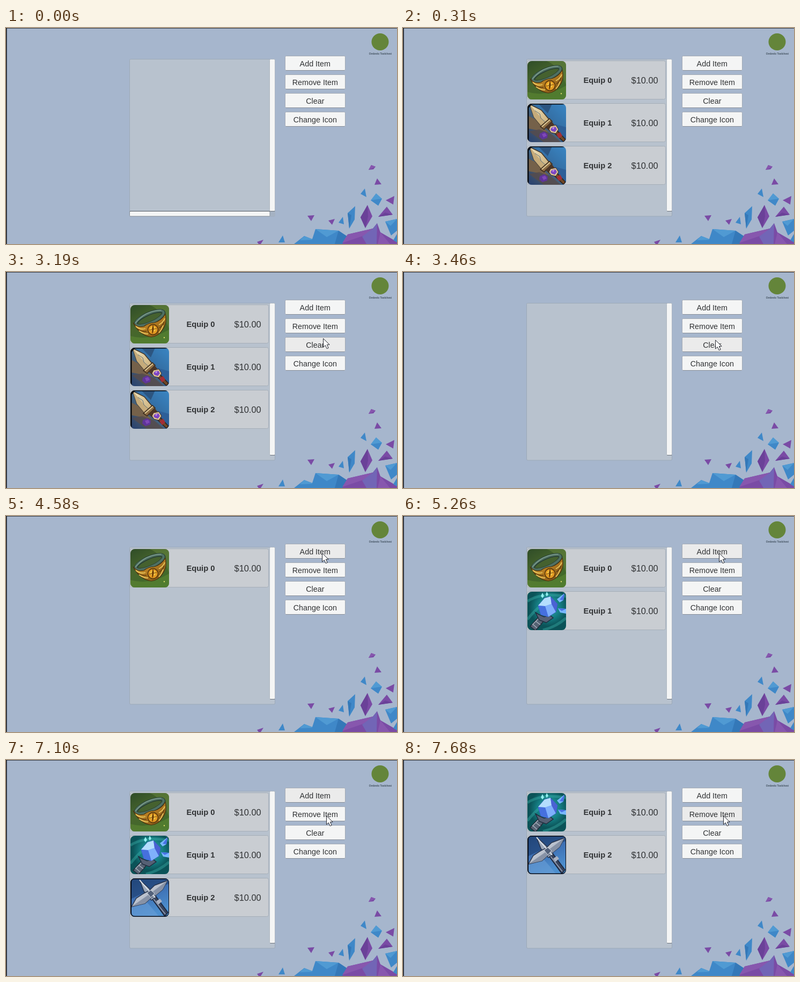
Recreate the animation shown at these times as an HTML page. Size 729x405 px, loop 8 s.

```html
<!DOCTYPE html>
<html lang="en">
<head>
<meta charset="utf-8">
<title>Item list</title>
<style>
  html, body { margin: 0; width: 100%; height: 100%; overflow: hidden; background: #a6b6cd; }
  svg { display: block; width: 100vw; height: 100vh; }
  text { font-family: "Liberation Sans", Arial, sans-serif; fill: #303234; text-anchor: middle; }
  .label { font-size: 14.35px; }
  .name { font-size: 14.7px; font-weight: bold; }
  .price { font-size: 16.4px; }
  .tiny { font-size: 4.7px; font-weight: bold; fill: #435260; }
  .p1 { fill: #7a4ba5; } .p2 { fill: #8757ae; } .p3 { fill: #6a4198; } .p4 { fill: #7265b6; }
  .b1 { fill: #3f88c8; } .b2 { fill: #509ad3; } .b3 { fill: #3478b8; }
</style>
</head>
<body>
<svg viewBox="0 0 729 405" preserveAspectRatio="none">
  <defs>
    <clipPath id="tile"><rect width="72" height="72" rx="8"/></clipPath>
    <linearGradient id="moss" x2=".6" y2="1">
      <stop stop-color="#2f4c28"/><stop offset=".5" stop-color="#48662c"/><stop offset="1" stop-color="#3f6a2a"/>
    </linearGradient>
    <linearGradient id="dusk" x1="1" y1="0" x2=".1" y2="1">
      <stop stop-color="#3a86c4"/><stop offset=".4" stop-color="#3470a6"/><stop offset=".7" stop-color="#4a5868"/><stop offset="1" stop-color="#2a4470"/>
    </linearGradient>
    <radialGradient id="sea" cx=".55" cy=".4">
      <stop stop-color="#35a9b4"/><stop offset=".6" stop-color="#157d82"/><stop offset="1" stop-color="#0b5358"/>
    </radialGradient>
    <linearGradient id="frost" x2=".4" y2="1">
      <stop stop-color="#244a80"/><stop offset=".5" stop-color="#3e70b4"/><stop offset="1" stop-color="#4d8fce"/>
    </linearGradient>
    <linearGradient id="gold" x2="1" y2="1">
      <stop stop-color="#dba938"/><stop offset=".5" stop-color="#b47c22"/><stop offset="1" stop-color="#6e4613"/>
    </linearGradient>
    <linearGradient id="bone" x2="1" y2="1">
      <stop stop-color="#efe3bd"/><stop offset="1" stop-color="#c9ad78"/>
    </linearGradient>
    <linearGradient id="steel" x2="1" y2="1">
      <stop stop-color="#e4e8ee"/><stop offset="1" stop-color="#8b96aa"/>
    </linearGradient>

    <g id="ring" clip-path="url(#tile)">
      <rect width="72" height="72" fill="url(#moss)"/>
      <path d="M36 0H72V44Q58 8 36 0Z" fill="#62803c" opacity=".6"/>
      <path d="M0 58Q36 68 72 46V72H0Z" fill="#5f8a34" opacity=".55"/>
      <g transform="rotate(-24 36 25)">
        <ellipse cx="36" cy="25" rx="28" ry="9" fill="#45612f" stroke="#263d33" stroke-width="7"/>
        <ellipse cx="36" cy="24.5" rx="28" ry="9" fill="none" stroke="#4f7062" stroke-width="4.5"/>
        <path d="M8 22Q36 8 62 20" fill="none" stroke="#86a394" stroke-width="1.3"/>
      </g>
      <path d="M5 33Q12 43 25 40Q34 33 45 33Q58 29 65 17Q69 34 60 46Q53 58 39 60Q17 57 5 33Z" fill="url(#gold)" stroke="#4a3310" stroke-width="1.2"/>
      <path d="M10 40Q18 47 28 44M16 48Q25 55 33 54M53 37Q61 33 64 25M53 52Q58 47 61 38" fill="none" stroke="#e8c75e" stroke-width="1.8"/>
      <path d="M12 44Q22 51 30 49M54 43Q60 39 63 31" fill="none" stroke="#5b3b10" stroke-width="1.5"/>
      <circle cx="42" cy="46" r="9.5" fill="#e39a22" stroke="#5e3b0d" stroke-width="1.8"/>
      <circle cx="42" cy="45" r="5" fill="#f8cb46"/>
      <path d="M42 38Q45 45 41 53Q39 45 42 38M35 47L49 44" fill="#754309" stroke="#754309"/>
      <circle cx="63" cy="61" r="1.2" fill="#dcd86a"/>
    </g>

    <g id="spear" clip-path="url(#tile)">
      <rect width="72" height="72" fill="url(#dusk)"/>
      <path d="M0 22L14 29L28 44L40 54L30 52L0 46Z" fill="#75614a"/>
      <path d="M3 52L22 48L44 56L62 72H30Z" fill="#574c4c" opacity=".8"/>
      <path d="M20 0H46L38 18Z" fill="#2c5580"/>
      <path d="M50 38L72 44V72H64Z" fill="#2d5f98"/>
      <path d="M35 40L41 35L71 67L67 71Z" fill="#714827" stroke="#2e2018" stroke-width="1.5"/>
      <path d="M4 1L26 12L40 29L37 40L26 42L12 25Z" fill="url(#bone)" stroke="#413528" stroke-width="1.5"/>
      <path d="M4 1L20 20L35 38L26 42L12 25Z" fill="#c5ab7b"/>
      <path d="M14 13L23 19L25 27L35 36" fill="none" stroke="#5c6f79"/>
      <path d="M24 43L41 28L46 33L31 48Z" fill="#8a6a42" stroke="#39291a" stroke-width="1.5"/>
      <path d="M27 43L42 30" stroke="#dbc796" stroke-width="2"/>
      <path d="M33 44L46 34L51 41L41 51Z" fill="#4b3526"/>
      <path d="M43 42L53 40L58 48L53 56L44 54L40 48Z" fill="#dcc595" stroke="#3c2524"/>
      <path d="M46 44L52 43L55 48L51 53L45 51L43 48Z" fill="#7d45c4"/>
      <path d="M46 45L51 44L48 48Z" fill="#c99bf0"/>
      <path d="M54 58L61 53L65 60L59 65Z" fill="#a32e35"/>
      <path d="M23 56L31 52L38 57L37 64L28 67L22 62Z" fill="#5f349a"/>
      <path d="M27 57L33 55L36 60L30 63Z" fill="#7f48b8"/>
      <path d="M0 0H72V1.5H8L2.5 8V72H0Z" fill="#080b10"/>
    </g>

    <g id="wand" clip-path="url(#tile)">
      <rect width="72" height="72" fill="url(#sea)"/>
      <path d="M0 18Q27 0 72 9M0 52Q16 32 25 27M29 72Q55 65 72 49" fill="none" stroke="#3cb4ac" stroke-width="5" opacity=".4"/>
      <path d="M5 65L22 46L32 53L15 73Z" fill="#566273" stroke="#202a38" stroke-width="1.5"/>
      <path d="M9 62L23 48M10 61L18 68M15 55L24 62" fill="none" stroke="#a3afba" stroke-width="1.5"/>
      <path d="M15 39L22 43L31 47L42 44L48 49L35 58L22 53Z" fill="#556074" stroke="#1f2c3e" stroke-width="1.5"/>
      <path d="M20 26L32 12L43 9L56 23L53 38L39 47L25 43Z" fill="#5d8cf2" stroke="#2a58b8"/>
      <path d="M32 12L43 9L45 23L33 27L20 26Z" fill="#b4defd"/>
      <path d="M33 27L45 23L53 38L39 47Z" fill="#7fb0fb"/>
      <path d="M20 26L33 27L39 47L25 43Z" fill="#4670de"/>
      <path d="M45 23L43 9L56 23L53 38Z" fill="#4a62d4"/>
      <path d="M55 14L69 3L67 16L60 20ZM57 31L72 32V41L61 39Z" fill="#78b8ff"/>
      <path d="M60 15L69 3L67 16ZM57 31L72 32L64 36Z" fill="#4870e4"/>
      <path d="M28 2L31 8L28 12L25 8ZM36 0L39 5L36 9L34 5Z" fill="#91efef"/>
    </g>

    <g id="mace" clip-path="url(#tile)">
      <rect width="72" height="72" fill="url(#frost)"/>
      <path d="M0 0H72V10L40 20L0 39Z" fill="#214578" opacity=".7"/>
      <path d="M0 55L31 45L54 72H0Z" fill="#6a9fd7" opacity=".6"/>
      <path d="M37 34L44 29L70 64L64 71Z" fill="#39445c" stroke="#18233a" stroke-width="1.5"/>
      <path d="M41 36L65 67" stroke="#8d98ae" stroke-width="2"/>
      <path d="M17 3L31 15L41 25L48 34L39 41L25 24Z" fill="#9ba7b9" stroke="#28344b" stroke-width="1.5"/>
      <path d="M69 4L60 21L48 31L39 36L27 47L2 53L11 37L25 28L35 23L45 13Z" fill="url(#steel)" stroke="#2a374f" stroke-width="1.5"/>
      <path d="M69 4L36 29L2 53L27 47L39 36L48 31L60 21Z" fill="#8792a6"/>
      <path d="M17 3L38 27L46 36" fill="none" stroke="#dce2e9" stroke-width="2"/>
      <path d="M31 27L38 22L45 28L38 36Z" fill="#53617a" stroke="#d1d7df"/>
      <path d="M48 43L55 38L59 43L52 49Z" fill="#aab2c2"/>
      <path d="M0 0H72V72H0ZM2 7Q2 2 7 1.5H66Q71 2 71 7V65Q70 70 64 70.5H8Q2 70 2 64Z" fill="#080b14" fill-rule="evenodd"/>
    </g>
  </defs>

  <rect width="729" height="405" fill="#a6b6cd"/>
  <rect width="729" height="1" fill="#343a43"/>
  <rect width="1.6" height="405" fill="#15181d"/>

  <circle cx="697.5" cy="26" r="16" fill="#64853a"/>
  <text class="tiny" x="698" y="49.5">Ombrelo Toolchest</text>

  <g id="shards">
    <path class="p1" d="M676 266L681 257L689 260L685 265Z"/>
    <path class="p2" d="M676 266L681 257L689 260Z"/>
    <path class="p1" d="M692 282L700 293L687 294Z"/>
    <path class="b1" d="M669 301L672 317L661 311Z"/>
    <path class="b2" d="M680 323L690 310L701 320L694 333Z"/>
    <path class="b1" d="M680 323L701 320L694 333Z"/>
    <path class="p1" d="M708 323L724 315L722 331Z"/>
    <path class="p1" d="M674 332L683 353L670 375L661 355Z"/>
    <path class="p3" d="M674 332L675 354L670 375L661 355Z"/>
    <path class="p1" d="M710 335L721 350L694 354Z"/>
    <path class="p3" d="M694 354L707 346L721 350Z"/>
    <path class="b1" d="M637 347L651 334L650 359L640 376Z"/>
    <path class="b3" d="M637 347L644 351L640 376Z"/>
    <path class="p1" d="M562 352L575 351L569 362Z"/>
    <path class="p1" d="M601 361L613 358L608 369Z"/>
    <path class="b1" d="M628 354L630 368L620 365Z"/>
    <path class="b1" d="M707 363L729 358V380L718 389Z"/>
    <path class="b2" d="M707 363L729 358L717 371Z"/>
    <path class="b1" d="M516 389L520 402L508 402Z"/>
    <path class="p1" d="M468 401L480 397L475 405H471Z"/>
    <path class="b1" d="M537 405L556 390L574 397L570 405Z"/>
    <path class="b2" d="M556 390L574 397L548 398Z"/>
    <path class="b1" d="M577 377L620 380L635 390L628 405H568Z"/>
    <path class="b2" d="M577 377L620 380L598 392Z"/>
    <path class="b3" d="M620 380L635 390L628 405H613Z"/>
    <path class="p1" d="M627 405L637 387L684 376L692 366L698 383L729 401V405Z"/>
    <path class="p2" d="M637 387L684 376L668 389L627 403Z"/>
    <path class="p4" d="M684 376L692 366L691 405H672L664 391Z"/>
    <path class="p2" d="M698 383L716 405H693Z"/>
    <path class="b1" d="M729 386V402L722 398Z"/>
  </g>

  <rect x="230.5" y="58.5" width="271" height="294.5" rx="2" fill="#b8c2ce" stroke="#9ca9b8"/>
  <g id="hbar">
    <rect x="492" y="344" width="10" height="9" fill="#a5b2c3"/>
    <rect x="230.5" y="343.5" width="261.5" height="9.5" rx="1.5" fill="#f4f5f5" stroke="#858e99"/>
    <path d="M231 343.5H492" stroke="#505861"/>
  </g>
  <rect x="491.5" y="58.5" width="10" height="285" rx="2" fill="#f4f5f5" stroke="#aeb7c1"/>
  <path d="M492.5 343.5H501" stroke="#6b727b"/>

  <g id="rows"></g>
  <g id="buttons"></g>
  <path id="cursor" d="M.6 .8V17L4.4 13.5L7.2 19.7L10.2 18.4L7.4 12.2H12.2Z" fill="#fff" stroke="#20232b" stroke-linejoin="round"/>
</svg>
<script>
const LOOP = 8000;
const NS = "http://www.w3.org/2000/svg";
const $ = id => document.getElementById(id);

function add(parent, tag, attrs, text) {
  const el = document.createElementNS(NS, tag);
  for (const k in attrs) el.setAttribute(k, attrs[k]);
  if (text) el.textContent = text;
  return parent.appendChild(el);
}

const ADD = 0, REMOVE = 1, CLEAR = 2;
const FILL = { idle: "#f4f5f5", hover: "#ebebeb", press: "#c5c6c8" };

const buttons = ["Add Item", "Remove Item", "Clear", "Change Icon"].map((label, i) => {
  const y = 52.5 + i * 35;
  const box = add($("buttons"), "rect", { x: 520.5, y, width: 112, height: 27, rx: 2, stroke: "#a3aab4" });
  add($("buttons"), "path", { d: `M522 ${y + 27}H631`, stroke: "#868d97" });
  add($("buttons"), "text", { class: "label", x: 576.3, y: y + 19 }, label);
  return box;
});

const rows = [0, 1, 2].map(i => {
  const g = add($("rows"), "g", { transform: `translate(231 ${61.5 + i * 80})` });
  add(g, "rect", { x: 0.5, width: 258, height: 72, rx: 3, fill: "#c9cdd2", stroke: "#a5aeb8" });
  const icon = add(g, "use", { x: 1, y: 0.5 });
  const name = add(g, "text", { class: "name", x: 131.9, y: 41.5 });
  add(g, "text", { class: "price", x: 219.6, y: 42.3 }, "$10.00");
  return { g, icon, name };
});

// Each track holds its value until the next time stamp.
const cursorTrack = [
  [1390, 661, 104], [1510, 637, 120], [1630, 607, 133], [1790, 594, 133],
  [1930, 590, 133], [2050, 588, 133], [2920, 597, 112], [3040, 607, 91],
  [3190, 591, 124], [3310, 582, 127], [3770, 589, 95], [3890, 593, 56],
  [4040, 591, 63], [4160, 589, 68], [4310, 589, 69], [6710, 611, 92],
  [6830, 634, 117], [6980, 615, 110], [7100, 597, 104]
];
const buttonTrack = [
  [1630, CLEAR, "hover"], [2920, REMOVE, "hover"], [3190, CLEAR, "hover"],
  [3310, CLEAR, "press"], [3460, CLEAR, "hover"], [3770, REMOVE, "hover"],
  [3890, ADD, "hover"], [4460, ADD, "press"], [4580, ADD, "hover"],
  [5130, ADD, "press"], [5260, ADD, "hover"], [6280, ADD, "press"],
  [6430, ADD, "hover"], [7530, REMOVE, "press"], [7680, REMOVE, "hover"]
];
// time, number of the first item, icons
const listTrack = [
  [310, 0, ["ring", "spear", "spear"]], [3460, 0, []], [4580, 0, ["ring"]],
  [5260, 0, ["ring", "wand"]], [6430, 0, ["ring", "wand", "mace"]],
  [7530, 1, ["wand", "mace"]]
];

const at = (track, t) => track.filter(step => step[0] <= t).pop();
const show = (el, on) => el.setAttribute("visibility", on ? "visible" : "hidden");

function draw(t) {
  const pos = at(cursorTrack, t);
  show($("cursor"), pos);
  if (pos) $("cursor").setAttribute("transform", `translate(${pos[1]} ${pos[2]})`);

  const [, active, state] = at(buttonTrack, t) || [0, -1, "idle"];
  buttons.forEach((box, i) => box.setAttribute("fill", FILL[i === active ? state : "idle"]));

  const [, first, icons] = at(listTrack, t) || [0, 0, []];
  rows.forEach((row, i) => {
    show(row.g, i < icons.length);
    if (i >= icons.length) return;
    row.icon.setAttribute("href", "#" + icons[i]);
    row.name.textContent = "Equip " + (first + i);
  });
  show($("hbar"), t < 310);
}

const start = performance.now();
function tick() {
  draw((performance.now() - start) % LOOP);
  requestAnimationFrame(tick);
}
tick();
</script>
</body>
</html>
```
